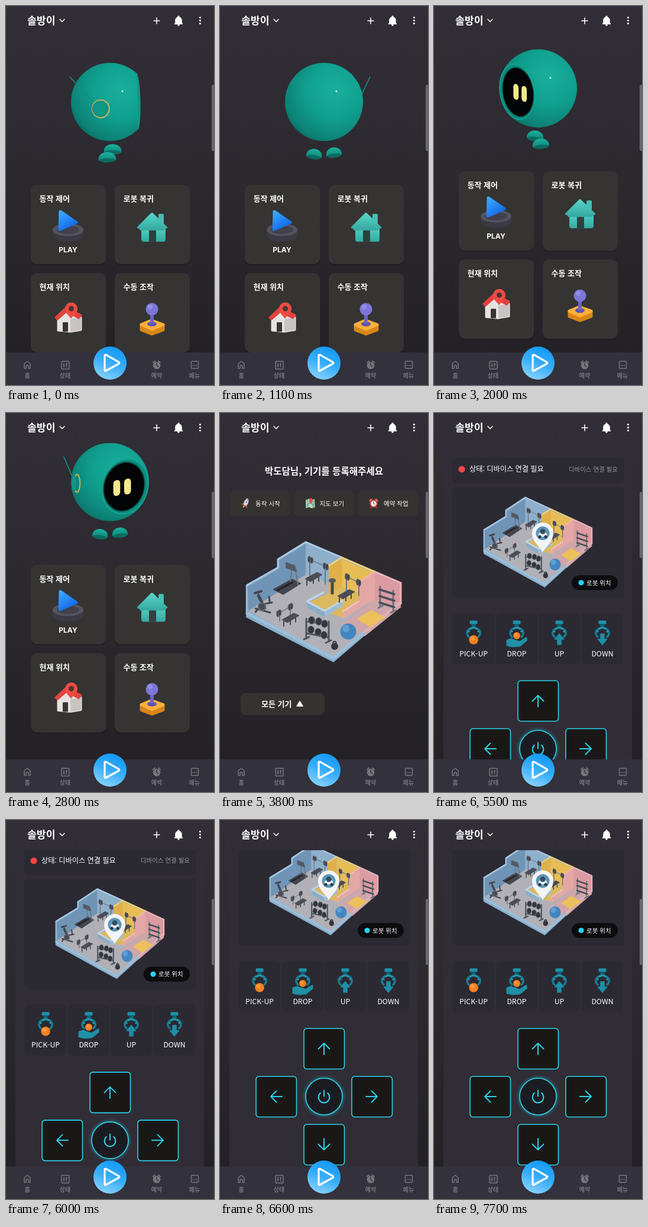
An HTML page for the animation above (7.8 s loop, 352 by 640 pixels).

```html
<!DOCTYPE html>
<html lang="ko">
<head>
<meta charset="utf-8">
<style>
html, body { margin: 0; width: 100%; height: 100%; overflow: hidden; background: #2a272d; }
svg { display: block; width: 352px; height: 640px; }
text { font-family: "Noto Sans CJK KR", "Noto Sans CJK JP", "Noto Sans CJK", sans-serif; fill: #fff; }
.line { fill: none; stroke-linecap: round; stroke-linejoin: round; }
.glow { filter: drop-shadow(0 0 3px #22d3ee99); }
</style>
</head>
<body>
<svg id="stage" viewBox="0 0 352 640"></svg>
<script>
const LOOP = 7800;

// Shape helpers: each returns SVG markup
const box = (x, y, w, h, r, fill, more = '') =>
  `<rect x="${x}" y="${y}" width="${w}" height="${h}" rx="${r}" fill="${fill}" ${more}/>`;
const dot = (x, y, r, fill, more = '') => `<circle cx="${x}" cy="${y}" r="${r}" fill="${fill}" ${more}/>`;
const oval = (x, y, rx, ry, fill, more = '') =>
  `<ellipse cx="${x}" cy="${y}" rx="${rx}" ry="${ry}" fill="${fill}" ${more}/>`;
const poly = (d, fill, round = 0) =>
  `<path d="M${d}z" fill="${fill}" stroke="${fill}" stroke-width="${round}" stroke-linejoin="round"/>`;
const line = (d, color, w = 2) => `<path class="line" d="M${d}" stroke="${color}" stroke-width="${w}"/>`;
const text = (s, x, y, size, weight = 700, more = '') =>
  `<text x="${x}" y="${y}" font-size="${size}" font-weight="${weight}" ${more}>${s}</text>`;
const mid = 'text-anchor="middle"';
const group = (content, transform) => `<g transform="${transform}">${content}</g>`;

const defs = `<defs>
  <linearGradient id="bg" x2="0" y2="1"><stop stop-color="#312e37"/><stop offset=".45" stop-color="#2c292f"/><stop offset="1" stop-color="#222024"/></linearGradient>
  <linearGradient id="play" x1=".7" x2=".3" y2="1"><stop stop-color="#1298f6"/><stop offset=".5" stop-color="#37adf9"/><stop offset="1" stop-color="#8ad3fd"/></linearGradient>
  <linearGradient id="blue" x2=".6" y2="1"><stop stop-color="#3fa9ff"/><stop offset="1" stop-color="#1168e8"/></linearGradient>
  <linearGradient id="mint" x2="0" y2="1"><stop stop-color="#58d3c6"/><stop offset="1" stop-color="#36aaa2"/></linearGradient>
  <linearGradient id="foot" x2="0" y2="1"><stop stop-color="#1bb39f"/><stop offset="1" stop-color="#0b7c70"/></linearGradient>
  <radialGradient id="skin" gradientUnits="userSpaceOnUse" cx="194" cy="142" r="104"><stop stop-color="#19af9c"/><stop offset=".45" stop-color="#10a08f"/><stop offset=".8" stop-color="#0c8377"/><stop offset="1" stop-color="#0a645c"/></radialGradient>
  <clipPath id="view"><path d="M0 51H352V586H0z"/></clipPath>
</defs>`;

// Fixed header and navigation
function chrome() {
  const gray = '#77747d';
  const nav = [['홈', 36], ['상태', 100], ['예약', 255], ['메뉴', 319]];
  return text('솔방이', 36, 31, 17.2, 900) + line('91 22.5l4 4 4-4', '#fff', 1.5) +
    line('250 25h10M255 20v10', '#fff', 1.6) +
    poly('285 30.500h14l-1.800-2.500v-5a5.300 5.300 0 0 0-10.400 0v5z', '#fff', 1) +
    dot(292, 18, 1.7, '#fff') + dot(292, 32, 1.8, '#fff') +
    [19.5, 24.5, 29.5].map(y => dot(328.5, y, 1.6, '#fff')).join('') +
    box(348, 133, 8, 112, 3, '#69666e') +
    box(0, 585, 352, 55, 0, '#33313b') +
    line('31 604l5-4 5 4v8h-3v-5h-4v5h-3z', gray, 1.5) +
    box(94, 600, 13, 13, 1, 'none', `stroke="${gray}" stroke-width="1.5"`) +
    line('98 603v7M102.500 603v7M97 607h2M101.500 605h2', gray, 1.3) +
    dot(255, 607, 6.3, gray) + line('249 602l3-2.500M261 602l-3-2.500', gray, 2) + line('255 603v4l2.500 2', '#33313b', 1.4) +
    box(313.500, 600, 12, 12, 1, 'none', `stroke="${gray}" stroke-width="1.5"`) +
    [316.5, 319.5, 322.5].map(x => dot(x, 607, 0.9, gray)).join('') +
    nav.map(([s, x]) => text(s, x, 627.5, 10, 700, `${mid} style="fill:${gray}"`)).join('') +
    dot(176, 603, 28, 'url(#play)') + line('167 589.500v25.500a1.500 1.500 0 0 0 2 1l22-12a1.500 1.500 0 0 0 0-2.600l-22-12.500z', '#fff', 3.2);
}

// Page 1: feature cards
function cards() {
  const spots = [['동작 제어', 42, 302], ['로봇 복귀', 184, 302], ['현재 위치', 42, 451], ['수동 조작', 184, 451]];
  const play = oval(105, 387, 26, 11, '#3a3944') + box(79, 378, 52, 9, 0, '#3a3944') +
    oval(105, 378, 26, 10.5, '#55535f') + oval(105, 378, 19, 7, '#42404b') +
    poly('92 347l27 18.500-28 12z', 'url(#blue)', 5) +
    `<text x="105" y="416" font-size="12" font-weight="700" ${mid} style="font-family:Inter,sans-serif">PLAY</text>`;
  const house = box(258, 351, 9, 18, 2, '#45bfb4') + box(229, 370, 41, 28, 4, 'url(#mint)') +
    poly('247 351l24 23h-3l-1 3h-39l-1-3h-3z', 'url(#mint)', 4) + box(242, 379, 12, 19, 1, '#30403e');
  const place = poly('88 524l15-12 24 14v21l-18 3-21-2z', '#e6e2df', 3) + poly('109 529l18-4v22l-18 3z', '#c9c3c2') +
    poly('84 526l18-17 25 13-4 5-21-11-15 13z', '#e1433c', 3) + box(96, 534, 9, 16, 1, '#393435') +
    poly('110 528c-3-5-10-9-10-17a10.500 10.500 0 0 1 21 0c0 8-8 12-11 17z', '#ef4a42') + dot(110.500, 511, 4.5, '#4a3636');
  const stick = poly('229 539l17-8 20 8v8l-19 7-18-7z', '#d98518', 5) + poly('229 538l17-7 20 7-19 8z', '#fbb03b', 5) +
    oval(247, 537, 8, 4, '#5a53ad') + box(244, 518, 6, 19, 2, '#6c65c4') + dot(247, 512, 10.5, '#7d76d8') + dot(244, 508, 4, '#958ee8');
  return spots.map(([s, x, y]) => box(x, y + 2, 127, 134, 10, '#0003') + box(x, y, 127, 134, 10, '#353433') +
    text(s, x + 14.5, y + 28, 13)).join('') + play + house + place + stick;
}

// A truncated ball turning about its upright axis
function robot(t) {
  const turn = (97 + 0.106 * t) * Math.PI / 180, cx = 176, cy = 162, R = 66, D = 46, tilt = 0.2;
  const sin = Math.sin(turn), cos = Math.cos(turn), side = turn - 113 * Math.PI / 180;
  const es = Math.sin(side), ec = Math.cos(side);
  const axis = Math.atan2(cos * tilt, sin), reach = Math.hypot(sin, cos * tilt);
  const cut = Math.acos(Math.min(1, D / (reach * R)));
  const edge = a => `${cx + R * Math.cos(a)} ${cy + R * Math.sin(a)}`;
  const ball = cut < 0.01 ? dot(cx, cy, R, 'url(#skin)')
    : poly(`${edge(axis + cut)}A${R} ${R} 0 ${cut < Math.PI / 2 ? 1 : 0} 1 ${edge(axis - cut)}`, 'url(#skin)');
  const plane = `matrix(${cos} ${-sin * tilt} 0 .98 ${cx + D * sin} ${cy + D * cos * tilt})`;
  const eye = x => box(x - 11 * sin - 7, -13, 14, 27, 6, '#f3e98a');
  const front = cos > 0;
  const face = group(dot(0, 0, 47, front ? '#0d8c7f' : '#12988a', 'stroke="#18a897" stroke-width="1.500"') +
    (front ? dot(-4 * sin, 0, 43, '#07574f') + dot(-4 * sin, 0, 41, '#030405') + eye(-11) + eye(11) : ''), plane);

  const ex = cx + 60 * es, ey = cy + 60 * ec * tilt;
  const tipX = cx + 86 * Math.sin(turn - 149 * Math.PI / 180), tipY = 120;
  const rod = line(`${tipX} ${tipY}L${ex + (tipX - ex) * 0.2} ${ey + (tipY - ey) * 0.2}`, '#138f82', 1.7);
  const rx = 15 * Math.max(Math.abs(ec), 0.35);
  const ear = oval(ex - es * 3, ey, rx, 15, 'none', 'stroke="#d9b84f" stroke-width="1.800"') +
    oval(ex + es * 2, ey, rx * 0.87, 13, '#109686', 'stroke="#0b7b70" stroke-width="1"');
  const near = ec > -0.1;

  const foot = k => {
    const x = cx + k * 17 * es, y = 249 + k * 7 * ec, w = 11 + 4 * Math.abs(sin);
    return group(`<path d="M${-w} 3C${-w} -13 ${w} -13 ${w} 3C${w} 10 ${-w} 10 ${-w} 3" fill="url(#foot)"/>` +
      oval(0, 4.5, w * 0.9, 3, '#086b61'), `translate(${x} ${y}) rotate(${8 * cos * k})`);
  };
  const feet = ec > 0 ? foot(-1) + foot(1) : foot(1) + foot(-1);
  return feet + (near ? '' : rod) + (front ? '' : face) + ball + dot(197, 144, 1.6, '#d5fff5') +
    (front ? face : '') + (near ? rod + ear : '');
}

// Isometric gym, shared by two pages
function gym() {
  const dark = '#44464f', steel = '#6f747f';
  const barbell = (x, y, w, h) => line(`${x} ${y}l${w} ${h}`, '#777c87', 1.6) +
    [0, 0.14, 0.86, 1].map(k => oval(x + w * k, y + h * k, 2.6, 5.5, dark, `stroke="${steel}" stroke-width=".6"`)).join('');
  const bench = (x, y) => line(`${x + 3} ${y + 6}v9M${x + 23} ${y - 2}v10M${x + 14} ${y + 5}v7`, dark, 2) +
    poly(`${x} ${y + 4}l20-11 9 4-20 12z`, '#4a4d57', 1);
  const shell = poly('44 291l53-30v-14l48-30 162 70v36l-115 98-148-76z', '#8aaecb') +
    poly('47 333l98-61 61 22 56 18 44 12-114 91z', '#b1b0b7') +
    poly('47 293l53-30v-14l45-28v52l-97 61z', '#6f94b6') + poly('145 221l61 26v49l-61-24z', '#8fb0cb') +
    poly('206 247l56 23v46l-56-20z', '#e9bd55') + poly('206 294l56 20-54 31-30-8-28-17z', '#dcb95f') +
    poly('262 270l44 19v40l-44-15z', '#dc9ba1') + poly('262 314l44 14-61 49-39-20z', '#cfa6a9') +
    poly('262 270v44l-54 34v-13l27-17v-31z', '#e3a7a5') + poly('206 247l-22 12v46l22-11z', '#dfb04a') +
    line('45 291l53-30v-14l47-29 61 26', '#a9c8e0', 3) + line('206 244l-22 14M206 244l56 24', '#efd07a', 3) +
    line('235 286l27-18 44 19v35', '#eeb3b7', 3) +
    poly('147 318l30 16v11l-30-16z', '#8bacc7') + poly('177 334l30-17v9l-30 19z', '#9dbdd6') +
    line('177 334l30-17M177 334l-30-16 28-15', '#bcd4e6', 3.5) + line('208 335l27-17', '#eec0bc', 3) +
    line('46 338l146 76 54-45', '#9bbfdb', 5) + line('246 369l59-49', '#dfafb6', 5) + line('45 292v48', '#97bad6', 2.5);
  const treadmill = poly('91 298l31-17 14 7-29 18z', dark, 2) + line('119 287l3-27M132 290l-5-28', steel, 2) +
    poly('112 253l14 5 3 9-17-6z', '#545966', 2) + line('98 299l24-13', '#26272e', 4);
  const bike = line('65 306l12 24M88 320l-16 3-12 13M60 330l25 7M84 318l-1-8M71 322l-7-13', dark, 3) +
    dot(71, 327, 6.5, '#494c57', `stroke="${steel}" stroke-width="1.5"`) + line('59 304l11-3', dark, 4);
  const stand = line('146 347v34M184 352v33M147 352l36 5M147 372l36 7M142 382l9-4M179 388l9-4', '#4e525c', 3) +
    [[155, 350], [167, 352], [177, 356], [154, 366], [166, 370], [176, 375]].map(([x, y]) =>
      oval(x, y, 5.5, 6.5, '#34363d', `stroke="${steel}" stroke-width="1"`)).join('');
  const shelf = line('271 293v34M293 300v34M268 329l8-4M289 337l9-4', steel, 3) +
    [298, 309, 320].map(y => line(`270 ${y}l25 8`, '#4b4e59', 3.5)).join('');
  return shell + treadmill + line('152 252v29M178 262v27', steel, 2) + bench(144, 276) + barbell(151, 247, 30, 13) +
    line('190 284v20', dark, 5) + oval(190, 283, 6, 4, '#555863') + line('214 282v20M235 288v20', steel, 2) +
    bench(199, 305) + barbell(214, 276, 22, 11) + bike + line('101 336v15M119 328v13', steel, 2) +
    bench(105, 345) + barbell(98, 339, 23, -13) + stand + shelf +
    poly('232 348l24-15 23 12-25 16z', '#ecc05c', 1) + dot(217, 369, 13.5, '#4286c1') + dot(213, 364, 6, '#5f9fd3') +
    dot(194, 394, 6, '#34363d') + line('191 388q3-5 6 0', '#34363d', 2);
}

// Page 2: home
function home() {
  const chips = [['동작 시작', 17], ['지도 보기', 125.5], ['예약 작업', 234]];
  const tile = '#343332';
  const rocket = group(poly('0-9q6 7 3 14h-6q-3-7 0-14z', '#d9dae0') + poly('-3 1l-4 6 4-1zM3 1l4 6-4-1z', '#e14a46') +
    poly('-2.500-6q2.500-5 5 0z', '#e14a46') + dot(0, -2, 1.8, '#4596d8') + poly('-2 6h4l-2 5z', '#f8ad38'), 'translate(44 152) rotate(32) scale(.88)');
  const map = poly('145 147l5-2 5 2 5-2 1 14-5 2-5-2-6 2z', '#8fc7a2') + poly('150 145l5 2 1 14-5-2z', '#d9d6ab') +
    line('146 157l6-6 8 6', '#5aa5db', 1.6) + poly('154 154q-4-4-3-7a3 3 0 0 1 6 0q0 3-3 7z', '#e8514a');
  const clock = dot(260, 153, 6.5, '#e04b42') + dot(260, 153, 4.5, '#f4efeb') + line('260 150v3l2 1', '#444', 1) +
    line('254 148l2-2M266 148l-2-2', '#ee6b57', 3) + line('256 159l-1 1M264 159l1 1', '#b83832', 2);
  return text('박도담님, 기기를 등록해주세요', 176, 104, 15.6, 700, mid) +
    chips.map(([s, x]) => box(x, 132, 101, 42, 8, tile) + text(s, x + 43, 157, 10.5, 500)).join('') +
    rocket + map + clock + gym() +
    box(35, 473, 142, 37, 8, tile) + text('모든 기기', 70, 496, 13) + poly('130 495l5-8 5 8z', '#fff', 1.5);
}

// Page 3: manual control
function control() {
  const cyan = '#2bd2e8', teal = '#187b90', card = '#2b2932';
  const arms = [['PICK-UP', 67], ['DROP', 140], ['UP', 212], ['DOWN', 285]];
  const outline = `stroke="${cyan}" stroke-width="1.600"`;
  const claw = x => group(box(-6.5, 350.5, 13, 6, 1.5, '#1c93aa') + box(-3.5, 356, 7, 6, 1, '#126272') +
    line('-5 364c-7 2-8 9-3 14M5 364c7 2 8 9 3 14', teal, 3.6) + line('-5 364q5-3 10 0', '#2097ad', 3.6) +
    dot(-8, 369, 1.6, '#2fa5ba') + dot(8, 369, 1.6, '#2fa5ba'), `translate(${x} 0)`);
  const ball = (x, y, r) => dot(x, y, r, '#f58220') + dot(x - r * 0.25, y - r * 0.3, r * 0.4, '#ff9c42');
  const hand = poly('124 384l6-2 9 3 6 2 11-7v4l-11 9-12 1-9-2z', '#1f90a6', 3);
  const arrow = (x, y, turn) => group(poly('-3 9v-9h-4.500l7.500-9 7.500 9h-4.500v9z', '#1c8fa6', 1.5), `translate(${x} ${y}) rotate(${turn})`);
  const key = (x, y, turn) => box(x - 34, y - 34, 68.500, 68.500, 5, '#1a1817', outline) +
    group(line('0 10v-19M-9.500 .5l9.500-9.500 9.500 9.500', cyan, 2), `translate(${x} ${y}) rotate(${turn})`);
  const pin = poly('184 236c-3-9-18-18-18-33a18 18 0 0 1 36 0c0 15-15 24-18 33z', '#f3f4f5') + dot(184, 203, 11.5, '#5c95b8') +
    box(177, 202, 14, 7, 3, '#e4e9ed') + dot(184, 200, 4.5, '#344e60') + dot(179, 209, 2.5, '#29323c') + dot(189, 209, 2.5, '#29323c');
  return box(16, 60, 319, 680, 0, '#302d36') +
    box(31, 75, 291, 44, 8, card) + dot(47, 95, 5.6, '#fb4545') +
    text('상태: 디바이스 연결 필요', 60, 99, 12.2, 500) +
    text('디바이스 연결 필요', 311, 98.5, 10.5, 400, 'text-anchor="end" style="fill:#9794a0"') +
    box(31, 125, 291, 187, 8, card) + group(gym(), 'translate(53 -21) scale(.7 .75)') + pin +
    box(233, 274, 78, 25, 12.5, '#0d0c0e') + dot(249, 286.5, 4.6, '#24d3f3') + text('로봇 위치', 258, 290.5, 10.5, 500) +
    arms.map(([s, x]) => box(x - 36, 337, 71.5, 88, 8, card, 'stroke="#35323d" stroke-width=".800"') + claw(x) +
      text(s, x, 410.5, 12.3, 400, mid)).join('') +
    ball(67, 383, 7.8) + ball(140, 376, 6) + hand + arrow(212, 382, 0) + arrow(285, 382, 180) +
    key(176, 486, 0) + key(95, 567, -90) + key(257, 567, 90) + key(176, 648, 180) +
    dot(176, 567, 31, '#1b1c21', `class="glow" ${outline}`) +
    line('170 561a9.300 9.300 0 1 0 12 0M176 556.500v10', cyan, 2);
}

const stage = document.getElementById('stage');
stage.innerHTML = defs + box(0, 0, 352, 640, 0, 'url(#bg)') +
  `<g clip-path="url(#view)"><g id="p0">${cards()}<g id="bot"></g></g><g id="p1">${home()}</g><g id="p2">${control()}</g></g>` + chrome();
const pages = [0, 1, 2].map(i => document.getElementById('p' + i));
const bot = document.getElementById('bot');

const ease = (t, from, to) => {
  const k = Math.min(1, Math.max(0, (t - from) / (to - from)));
  return k * k * (3 - 2 * k);
};

function draw() {
  const t = performance.now() % LOOP;
  const current = t < 3300 ? 0 : t < 4600 ? 1 : 2;
  pages.forEach((p, i) => p.style.display = i === current ? '' : 'none');
  if (current === 0) bot.innerHTML = robot(t);
  pages[0].setAttribute('transform', `translate(0 ${-45.5 * ease(t, 1700, 2300)})`);
  pages[2].setAttribute('transform', `translate(0 ${-100 * ease(t, 5800, 6400)})`);
  requestAnimationFrame(draw);
}
draw();
</script>
</body>
</html>
```
